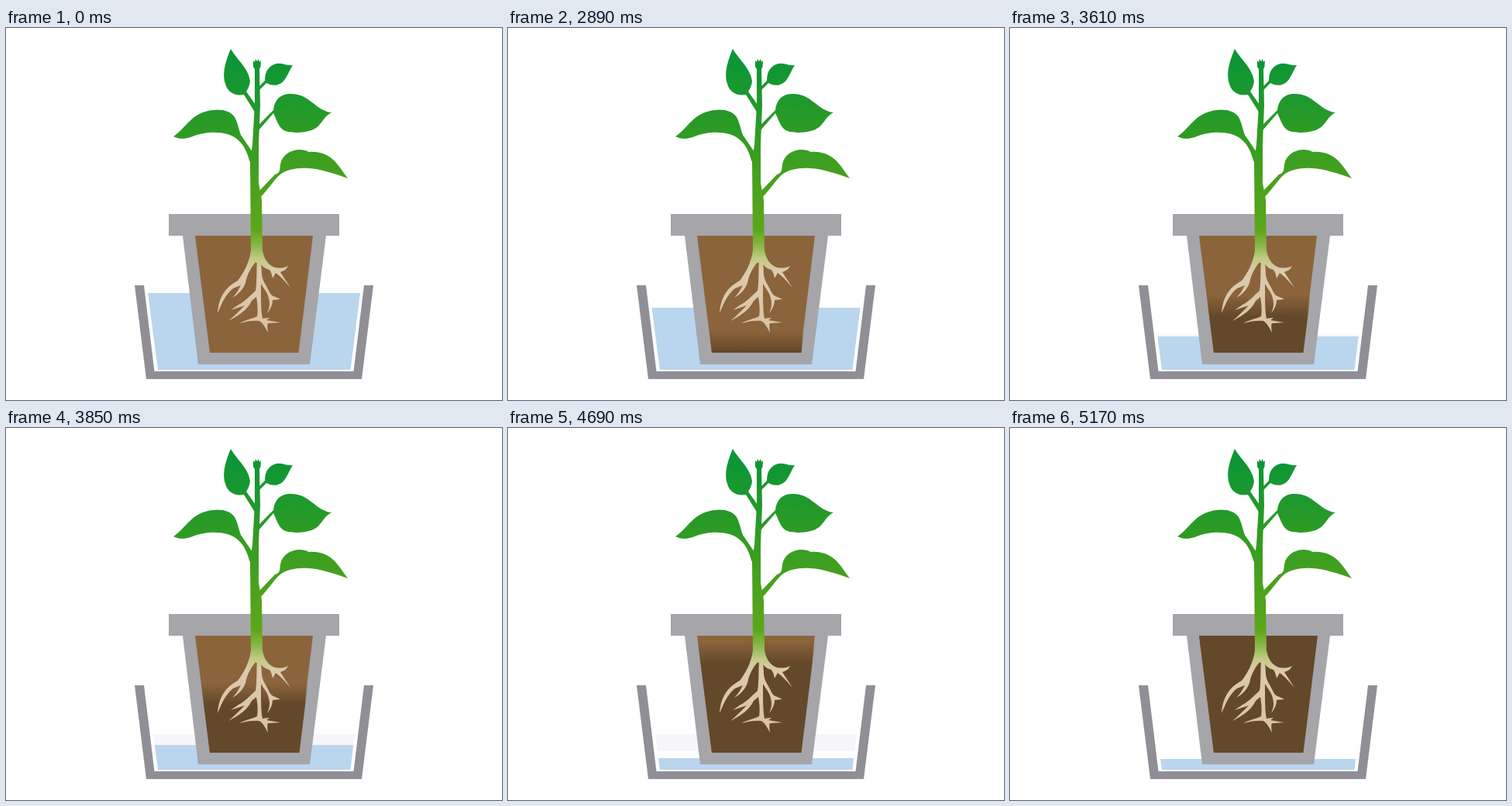
An HTML page that plays this animation: 640x480 px, repeating every 5230 ms.

```html
<!DOCTYPE html>
<html lang="en">
<head>
<meta charset="utf-8">
<title>Bottom watering</title>
<style>
  html, body { margin: 0; width: 100%; height: 100%; overflow: hidden; background: #fff; }
  svg { display: block; width: 100vw; height: 100vh; }
</style>
</head>
<body>
<svg viewBox="0 0 640 480">
  <defs>
    <linearGradient id="leafColor" gradientUnits="userSpaceOnUse" x1="0" y1="27" x2="0" y2="392">
      <stop offset="0" stop-color="#069539"/>
      <stop offset=".25" stop-color="#279a27"/>
      <stop offset=".43" stop-color="#43a01e"/>
      <stop offset=".64" stop-color="#5ba719"/>
      <stop offset=".69" stop-color="#84b544"/>
      <stop offset=".74" stop-color="#bfca80"/>
      <stop offset=".785" stop-color="#dccaae"/>
      <stop offset="1" stop-color="#d9c3a5"/>
    </linearGradient>
    <linearGradient id="wetColor" gradientUnits="userSpaceOnUse" x1="0" x2="0">
      <stop offset="0" stop-color="#64482a" stop-opacity="0"/>
      <stop offset="1" stop-color="#64482a"/>
    </linearGradient>
  </defs>

  <polygon id="residue" fill="#f7f6fb" points="190,395 450,395 447,417 193,417"/>
  <polygon id="water" fill="#bad6ee"/>
  <path fill="#908f96" d="M166 332H178L191.500 443H448.500L462 332H474L459 453H181Z"/>

  <path fill="#a6a5a9" d="M210 240H430V268H413L392 434H248L228 268H210Z"/>
  <path fill="#8b643b" d="M244 268H396L377.500 419H263Z"/>
  <path id="wet" fill="url(#wetColor)" d="M244 268H397L378.500 419H263Z"/>

  <g fill="url(#leafColor)">
    <!-- stem and bud -->
    <path d="M319 42L321 44L322 40L324 43L326 40L327 44L329 42L328.500 50L327 53L328 100L326 150L326 200L330 222L331 288C332 298 326 302 323.500 303C319 301 315 299 316 288L315 172L318 150L321 100L321 53L319 50Z"/>
    <!-- leaves with their stalks -->
    <path d="M290 27C299 42 313 52 315 69C314 75 312 79 310 82L322 99V110L307 86C297 88 286 84 283 72C278 57 285 39 290 27Z"/>
    <path d="M370 48C363 59 361 70 351 73C345 75 340 73 336 71L326 81V76L334 68C334 55 340 48 349 46C357 45 363 49 370 48Z"/>
    <path d="M420 109C408 115 408 127 394 132C381 136 364 136 357 131C350 125 349 117 345 110L326 132V125L345 106C347 91 355 86 365 85C391 83 398 106 420 109Z"/>
    <path d="M216 140C230 131 237 114 257 108C275 103 289 106 295 115C299 122 300 130 303 138L318 160V178L314 171C311 160 307 151 300 145C288 133 263 133 246 138C237 141 229 146 216 140Z"/>
    <path d="M441 194C424 188 407 182 390 181C374 180 363 183 355 188C347 194 343 203 326 221V211L347 189C354 187 353 183 354 176C357 158 379 153 391 160C421 158 430 180 441 194Z"/>
    <!-- roots -->
    <path d="M316 287C314 303 306 317 299 326C287 333 275 342 273 368C279 354 283 344 293 336L303 332C300 338 297 343 292 348C300 344 306 337 309 329C311 318 317 307 324 300L328 298L323 289Z"/>
    <path d="M324 300C323 313 324 328 322 339C313 347 307 354 300 357L290 364L308 358C300 366 294 372 287 378C301 371 312 363 317 352L323 347C325 358 325 367 324 372C319 375 310 376 301 381C311 378 320 377 327 378C333 382 335 388 338 393C337 386 337 382 338 381L354 380L336 377C343 372 340 374 331 375C329 366 329 351 329 330C333 337 338 342 339 349C341 356 340 361 337 368C342 362 344 356 344 351L354 350C347 346 342 347 339 339C335 330 331 327 330 318L329 298Z"/>
    <path d="M331 287C333 299 339 306 347 309C354 310 358 310 364 307C361 313 358 313 354 315L367 335C361 328 356 322 348 316L344 323C343 318 342 315 340 312C334 310 330 308 326 300Z"/>
  </g>
</svg>
<script>
  const LOOP = 5230, HOLD = 2470, STEP = 60, LAST = 46;
  // [step, water surface y]
  const LEVELS = [[0, 342], [1, 343], [4, 349.5], [8, 361], [16, 386], [21, 401.5],
                  [24, 409], [27, 415], [31, 421], [36, 425], [38, 426], [46, 427]];
  const byId = id => document.getElementById(id);
  const water = byId('water'), wet = byId('wet'), residue = byId('residue'), wetColor = byId('wetColor');

  function waterLevel(step) {
    const i = Math.max(1, LEVELS.findIndex(([s]) => s >= step));
    const [s0, y0] = LEVELS[i - 1], [s1, y1] = LEVELS[i];
    return Math.round(y0 + (y1 - y0) * (step - s0) / (s1 - s0));
  }

  function draw(time) {
    const step = time < HOLD ? 0 : Math.min(LAST, Math.floor((time - HOLD) / STEP) + 1);
    const y = waterLevel(step);
    const inset = (y - 342) * 0.13;
    water.setAttribute('points', `${183 + inset},${y} ${457 - inset},${y} 444.500,441 196,441`);
    residue.style.visibility = step < LAST ? 'visible' : 'hidden';

    // The damp front climbs at constant speed.
    const front = step < LAST ? 352 - 3.83 * (step - 18) : 230;
    wetColor.setAttribute('y1', front);
    wetColor.setAttribute('y2', front + 28);
    wet.style.visibility = step ? 'visible' : 'hidden';
  }

  const start = performance.now();
  function tick() {
    draw((performance.now() - start) % LOOP);
    requestAnimationFrame(tick);
  }
  tick();
</script>
</body>
</html>
```
